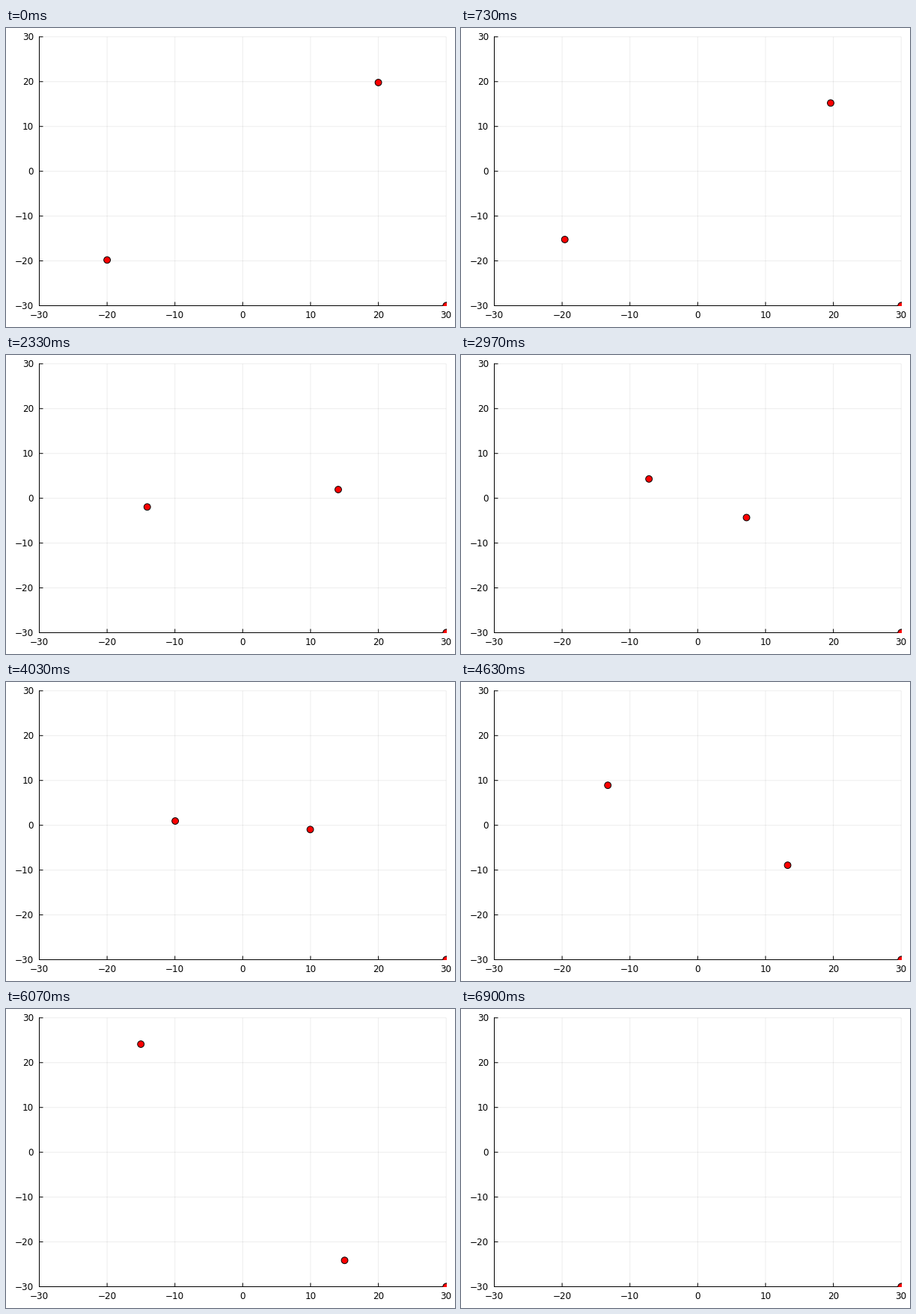
A matplotlib script for the animation above (8000 ms loop, 600 px wide and 400 px high).

```python
import numpy as np
import matplotlib.pyplot as plt
from matplotlib.animation import FuncAnimation
from matplotlib.patches import Circle, Rectangle

W, H, DPI = 600, 400, 100
FRAMES, LOOP_MS = 240, 8000
LEFT, RIGHT, TOP, BOTTOM = 44.5, 588.2, 11.8, 371.5
LIMIT = 30
PULL = 6.674 / 4  # G*m / (2r)^2 for two equal masses mirrored about the centre


def to_px(x, y):
    u = (x + LIMIT) / (2 * LIMIT)
    v = (y + LIMIT) / (2 * LIMIT)
    return LEFT + u * (RIGHT - LEFT), BOTTOM + v * (TOP - BOTTOM)


def pt(px):
    return px * 72 / DPI


def orbit(steps):
    """Path of one mass; the other one is its mirror image."""
    pos, vel = np.array([20.0, 20.0]), np.array([0.0, -0.2])
    path = []
    for _ in range(steps):
        acc = -PULL * pos / np.hypot(*pos) ** 3
        pos = pos + vel + acc / 2
        vel = vel + acc
        path.append(pos)
    return path


fig = plt.figure(figsize=(W / DPI, H / DPI), dpi=DPI, facecolor="white")
ax = fig.add_axes([0, 0, 1, 1])
ax.set_xlim(0, W)
ax.set_ylim(H, 0)
ax.axis("off")


def line(x0, y0, x1, y1, z, **style):
    ax.plot([x0, x1], [y0, y1], lw=pt(1), color="black", snap=False,
            solid_capstyle="butt", zorder=z, **style)


def label(x, y, value, ha):
    ax.text(x, y, str(value).replace("-", "\u2212"), ha=ha, va="baseline",
            family="DejaVu Sans", size=pt(12), color="black")


for value in range(-LIMIT, LIMIT + 1, 10):
    x, y = to_px(value, value)
    line(x, TOP, x, BOTTOM, 1, alpha=0.07)
    line(LEFT, y, RIGHT, y, 1, alpha=0.07)
    line(x, BOTTOM, x, BOTTOM - 5, 2)
    line(LEFT, y, LEFT + 5, y, 2)
    label(x, 387.6, value, "center")
    label(37.2, y + 4.4, value, "right")

line(LEFT, TOP - 0.5, LEFT, BOTTOM + 0.5, 2)
line(LEFT - 0.5, BOTTOM, RIGHT, BOTTOM, 2)

clip = Rectangle((LEFT - 0.5, TOP - 0.5), RIGHT - LEFT + 1, BOTTOM - TOP + 1,
                 transform=ax.transData)


def ball(x, y):
    dot = Circle(to_px(x, y), 4.4, facecolor="red", edgecolor="black",
                 lw=pt(1), zorder=3, snap=False)
    ax.add_patch(dot)
    dot.set_clip_path(clip)
    return dot


path = orbit(FRAMES)
first, second = ball(*path[0]), ball(*-path[0])
ball(LIMIT, -LIMIT)


def update(i):
    first.center = to_px(*path[i])
    second.center = to_px(*-path[i])
    return first, second


anim = FuncAnimation(fig, update, frames=FRAMES, interval=LOOP_MS / FRAMES,
                     repeat=True, repeat_delay=0, blit=False)
plt.show()
```
